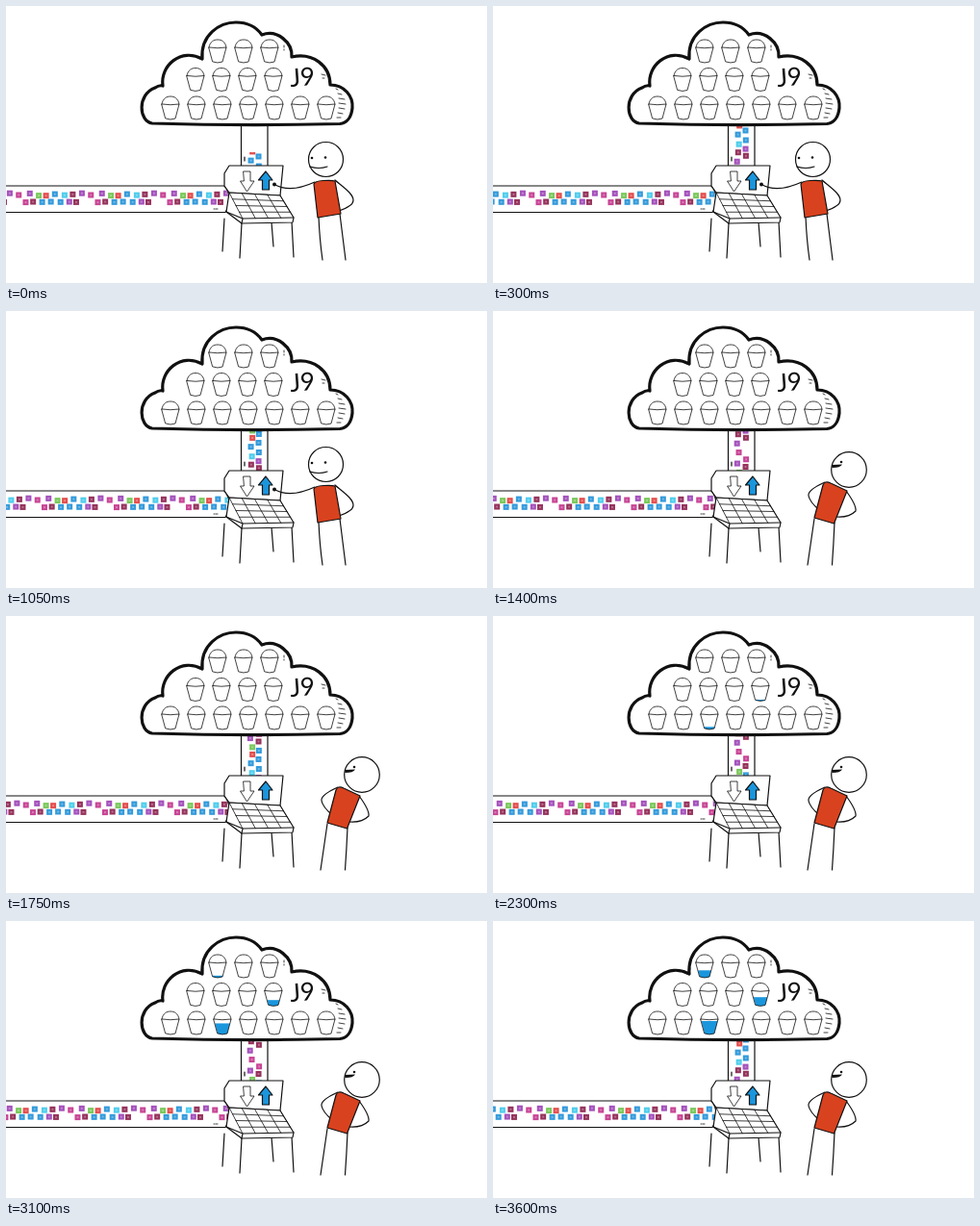
An HTML page for the animation above (3.65 s loop, 500 by 288 pixels).

```html
<!DOCTYPE html>
<html lang="en">
<head>
<meta charset="utf-8">
<style>
html, body { margin: 0; width: 100%; height: 100%; overflow: hidden; background: #fff; }
svg { display: block; width: 500px; height: 288px; }
.ink { fill: none; stroke: #111; stroke-width: 1.2; stroke-linecap: round; stroke-linejoin: round; }
.thin { stroke-width: .8; }
.thick { stroke-width: 3.2; }
.white { fill: #fff; }
.blue { fill: #1a96dd; }
.shirt { fill: #d9421e; }
.dot { fill: #111; stroke: none; }
text { font: 26px Lato, sans-serif; fill: #111; }
</style>
</head>
<body>
<svg viewBox="0 0 500 288">
  <defs>
    <clipPath id="pipeClip"><path d="M0 188H228L232 200L229 213H0Z"/></clipPath>
    <clipPath id="shaftClip"><rect id="front" x="245" width="27" height="60"/></clipPath>
    <clipPath id="body"><path d="M-9 0L-5 15Q0 17 5 15L9 0Z"/></clipPath>
    <path id="bucket" class="ink thin" d="M-9 0C-8-6-4-8 0-8S8-6 9 0M-9 0Q0 1.500 9 0L5 15Q0 17-5 15Z"/>
  </defs>

  <path class="ink" d="M244.500 123V167M272 123V167M248 157v4M0 187H227Q232 193 232 201T228 214.500H0"/>
  <path class="ink thin" d="M216 211h1M218 211h2"/>
  <g clip-path="url(#pipeClip)"><g id="flow"></g></g>
  <g clip-path="url(#shaftClip)"><g id="rise"></g></g>

  <path class="ink white thick" d="M152 122C138 120 136 92 155 85Q159 82 163 83C160 62 182 43 204 55C202 30 222 17 239 17C252 17 261 23 266 30C282 24 298 38 297 53C319 48 337 62 337 82C352 82 361 94 360 106C359 116 354 122 347 122.500Q250 125 152 122Z"/>
  <path class="ink thin" d="M289 41v2M289 45v1M328 71l4 1M329 75h2M343 86l2 1M345 91l4 1M346 96l6 1M346 101l7 1M346 106l6 1M345 111l5 1M344 116h4"/>
  <text x="295" y="83" transform="rotate(-4 308 74)">J9</text>
  <g id="buckets"></g>

  <g class="ink">
    <path d="M227 221L225 255M245 226L243 262M276 225L278 250M297 224L299 261"/>
    <path class="white" d="M232 166L288 166L285 197L232 194L227 187V174Z"/>
    <path class="white" d="M232 194L285 197L299 220L298 225L245 226L229 214Z"/>
    <path d="M229 214L246 221L299 220M246 221L245 226"/>
    <path id="keys" class="thin"/>
    <path class="thin" d="M247 172h7v10h4l-7.500 11l-7-11h3.500Z"/>
    <path class="blue" d="M270 172l7 9h-3.500v10h-7v-10h-4Z"/>
  </g>

  <g id="pressing" class="ink">
    <path d="M325 219Q326 243 329 264M347 216L353 264"/>
    <path d="M321 183C308 189 292 193 279 185.500M342 181C350 188 361 195 361 202Q361 208 346 213"/>
    <circle class="dot" cx="279" cy="185.500" r="2"/>
    <path class="shirt" d="M320 185Q321 182 330 181.500T342 182L348 216L324 220Z"/>
    <circle class="white" cx="332.500" cy="159.500" r="18"/>
    <circle class="dot" cx="318" cy="158" r="1.300"/><circle class="dot" cx="332" cy="157.500" r="1.300"/>
    <path d="M316 167Q325 170 334 167"/>
  </g>
  <g id="watching" class="ink">
    <path d="M334 216L327 264M355 220Q354 243 352.500 264"/>
    <path d="M345 178Q327 186 328 192T339 207M367 187Q378 202 377 208Q370 215 357 214"/>
    <path class="shirt" d="M343 181Q345 176 351 179L368 187L354.500 221L334 215Z"/>
    <circle class="white" cx="370" cy="165" r="18.300"/>
    <circle class="dot" cx="362" cy="157" r="1.300"/>
    <path class="dot" d="M352 160L363 159.500Q361 163 352.500 163Z"/>
  </g>
</svg>
<script>
const LOOP = 3650, TURN = 1400, SPEED = 90, TILE = 75;
const CORE = ['#1f4f8c', '#1d8fd8', '#3cc8ea', '#f07a30', '#e03a3a', '#6cc24a'];
const EDGE = ['#9b3fb5', '#c2308a', '#8a1c4a'];
const $ = id => document.getElementById(id);

function add(parent, tag, attrs) {
  const el = document.createElementNS('http://www.w3.org/2000/svg', tag);
  for (const key in attrs) el.setAttribute(key, attrs[key]);
  return parent.appendChild(el);
}

function seeded(seed) {
  return () => (seed = seed * 16807 % 2147483647) / 2147483647;
}

function block(parent, x, y, color) {
  add(parent, 'rect', { x: x - 3, y: y - 3, width: 6, height: 6, fill: color, opacity: .9 });
  add(parent, 'rect', { x: x - 1, y: y - 1, width: 2, height: 2, fill: '#fff', opacity: .3 });
}

// Each tile holds one cluster: bright in the middle, purple at both ends
function stream(place) {
  const COUNT = 15, SPREAD = 64;
  for (let tile = -1; tile < 5; tile++) {
    const random = seeded(4711);
    for (let i = 0; i < COUNT; i++) {
      const u = i / (COUNT - 1) - .5;
      const along = tile * TILE + u * SPREAD + random() * 4;
      const across = (i % 2 ? 3.5 : -3.5) + (random() - .5) * 3;
      const palette = Math.abs(u) < .25 ? CORE : EDGE;
      place(along, across, palette[Math.floor(random() * palette.length)]);
    }
  }
}
stream((along, across, color) => block($('flow'), along, 199.5 + across, color));
stream((along, across, color) => block($('rise'), 258.5 + across, 155 + along, color));

// Filling buckets by row and column: start in ms, depth in px per second
const filling = {
  '2,2': { start: 2050, rate: 11 },
  '1,3': { start: 2050, rate: 6 },
  '0,0': { start: 2900, rate: 11 }
};
const levels = [];
[[220, 3], [197, 4], [171, 7]].forEach(([left, count], row) => {
  for (let col = 0; col < count; col++) {
    const g = add($('buckets'), 'g', { transform: `translate(${left + 27 * col} ${43 + 29.5 * row})` });
    const fill = filling[[row, col]];
    if (fill) {
      const rect = add(g, 'rect', { x: -10, width: 20, height: 20, class: 'blue', 'clip-path': 'url(#body)' });
      levels.push({ rect, ...fill });
    }
    add(g, 'use', { href: '#bucket' });
  }
});

let keys = 'M232 194L246 221';
for (let k = .25; k < 1; k += .25) {
  keys += `M${232 + 53 * k} ${194 + 3 * k}L${246 + 53 * k} ${221 - k}`;
  keys += `M${232 + 14 * k} ${194 + 27 * k}L${285 + 14 * k} ${197 + 23 * k}`;
}
$('keys').setAttribute('d', keys);

function draw(now) {
  const t = now % LOOP, travel = SPEED * t / 1000;
  $('flow').setAttribute('transform', `translate(${(travel + 45) % TILE} 0)`);
  $('rise').setAttribute('transform', `translate(0 ${-travel % TILE})`);
  $('front').setAttribute('y', Math.max(106, 152 - travel));
  for (const { rect, start, rate } of levels) {
    const depth = Math.min(14, Math.max(0, (t - start) / 1000 * rate));
    rect.setAttribute('y', depth ? 16 - depth : 20);
  }
  $('pressing').style.display = t < TURN ? '' : 'none';
  $('watching').style.display = t < TURN ? 'none' : '';
}

const start = performance.now();
(function tick() {
  draw(performance.now() - start);
  requestAnimationFrame(tick);
})();
</script>
</body>
</html>
```
